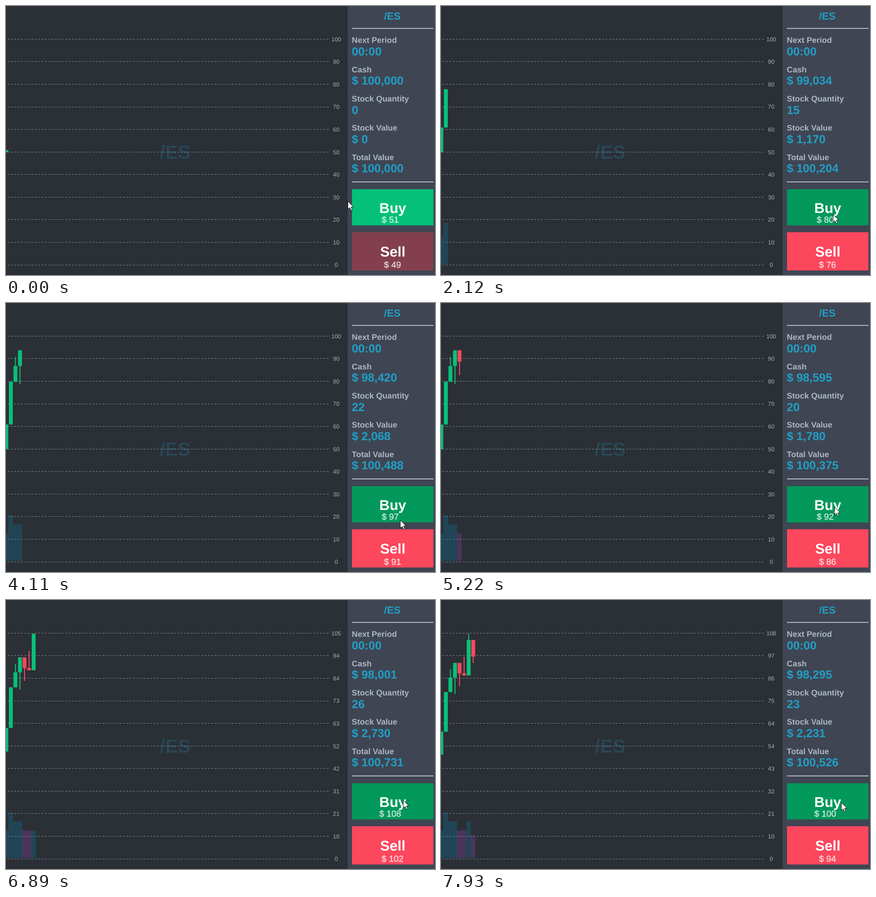
Recreate the animation shown at these times as an HTML page. Size 884 by 555 pixels, loop 8 s.

```html
<!DOCTYPE html>
<html lang="en">
<head>
<meta charset="utf-8">
<title>Trading game</title>
<style>
  html, body { margin: 0; width: 100%; height: 100%; overflow: hidden; background: #2b2f36; }
  svg { display: block; width: 884px; height: 555px; }
  text { font-family: "Liberation Sans", Arial, sans-serif; font-weight: 700; text-rendering: geometricPrecision; }
  .mid { text-anchor: middle; }
  .axis { font-size: 12px; font-weight: 400; fill: #a9b0b9; }
  .label { font-size: 16.7px; fill: #adb7c4; }
  .value { font-size: 24px; fill: #219fc6; }
  .title { font-size: 21px; fill: #219fc6; }
  .mark { font-size: 39px; fill: #20a4cc; opacity: .2; }
  .action { font-size: 29.3px; fill: #fff; }
  .price { font-size: 18px; font-weight: 400; fill: #fff; stroke: #fff; stroke-width: .35; opacity: .82; }
  .grid { stroke: #7d838b; stroke-width: 1; stroke-dasharray: 4 3; }
</style>
</head>
<body>
<svg viewBox="0 0 884 555">
  <rect width="884" height="555" fill="#2b2f36"/>
  <g id="axis"></g>
  <text class="mark mid" x="348.5" y="314.5">/ES</text>
  <g id="bars"></g>
  <rect x="704" width="180" height="555" fill="#3f4552"/>
  <text class="title mid" x="796" y="28">/ES</text>
  <rect x="713" y="45.4" width="168" height="1.7" fill="#c3cbd5"/>
  <rect x="713" y="362.1" width="168" height="1.7" fill="#c3cbd5"/>
  <g id="stats"></g>
  <rect id="buyBox" x="713" y="378" width="167.8" height="74.7"/>
  <text class="action mid" x="797" y="426.5">Buy</text>
  <text class="price mid" id="ask" x="791.7" y="447"></text>
  <rect id="sellBox" x="713" y="466.7" width="167.8" height="79"/>
  <text class="action mid" x="797" y="517">Sell</text>
  <text class="price mid" id="bid" x="796.5" y="540"></text>
  <path id="cursor" d="M0 0V16.5L3.9 12.9L6.6 19L9.2 17.9L6.6 11.9H11.8Z"
        fill="#fff" stroke="#111" stroke-width="1"/>
</svg>
<script>
const LOOP = 8000, BASE = 533.7, TOP = 68.4, STEP = 46.56, PITCH = 9.4;
const byId = id => document.getElementById(id);

function set(el, attrs) {
  for (const k in attrs) el.setAttribute(k, attrs[k]);
}
function make(parent, tag, attrs, text) {
  const el = document.createElementNS('http://www.w3.org/2000/svg', tag);
  set(el, attrs);
  if (text) el.textContent = text;
  parent.appendChild(el);
  return el;
}

// Buy and sell clicks of each period, and where the pointer rests on the Buy button.
const orders = ['BBBBBB', 'BBBBBBBBBB', 'BBBBBBSS', 'SSSBBBBB', 'SSSSBB', 'BBBSSS', 'BBBBBBBS', 'SSSSB'];
const rests = [[806, 432], [808, 430], [809, 428], [812.5, 448], [811, 421], [811, 421], [818.5, 413], [825, 418]];

const periodStart = i => i ? 300 + 1000 * i : 0;
const halfSpread = (period, count) => (period > 2 ? 3 : 2) - (count ? 0 : 1);
const money = n => '$ ' + n.toLocaleString('en-US');

// Clicks come in a steady rhythm, with a pause to change buttons.
const LEAD = 65, GAP = 88, PAUSE = 125, ARRIVAL = 560;
const trades = orders.flatMap((row, period) => {
  let at = Math.max(periodStart(period), ARRIVAL) + LEAD - GAP;
  return [...row].map((key, i) => {
    at += GAP + (i && key !== row[i - 1] ? PAUSE : 0);
    const [x, y] = rests[period];
    return key === 'B' ? { period, at, side: 1, x, y } : { period, at, side: -1, x: x + 10, y: 509 };
  });
});

const axisLabels = [];
for (let i = 0; i <= 10; i++) {
  const y = TOP + STEP * i, line = Math.floor(y) + .5;
  make(byId('axis'), 'line', { class: 'grid', x1: 665, x2: 0, y1: line, y2: line });
  axisLabels.push(make(byId('axis'), 'text', { class: 'axis mid', x: 680.5, y: y + 4.4 }));
}

const values = ['Next Period', 'Cash', 'Stock Quantity', 'Stock Value', 'Total Value'].map((name, i) => {
  const y = 60.3 * i;
  make(byId('stats'), 'text', { class: 'label', x: 712.6, y: 76.4 + y }, name);
  return make(byId('stats'), 'text', { class: 'value', x: 712.4, y: 102 + y });
});

const candleEls = orders.map(() => ({
  volume: make(byId('bars'), 'rect', { width: PITCH, opacity: .27 }),
  wick: make(byId('bars'), 'rect', { width: 2 }),
  body: make(byId('bars'), 'rect', { width: 8 })
}));

// Replays every click up to time t; each trade moves the price by the half spread.
function market(t) {
  let price = 50, cash = 100000, qty = 0, high = 100;
  const candles = [];
  for (let i = 0; i < orders.length && periodStart(i) <= t; i++) {
    const c = { open: price, low: price, high: price, count: 0 };
    for (const { period, side, at } of trades) {
      if (period !== i || at > t) continue;
      price += side * halfSpread(i, c.count++);
      cash -= side * price;
      qty += side;
      c.low = Math.min(c.low, price);
      c.high = Math.max(c.high, price);
    }
    c.close = price;
    high = Math.max(high, c.high);
    candles.push(c);
  }
  const last = candles.length - 1;
  return { price, cash, qty, high, candles, half: halfSpread(last, candles[last].count) };
}

// The pointer eases to each click's spot and settles shortly before the click.
function cursorAt(t) {
  let from = { at: 0, x: 704.5, y: 403 };
  for (const to of trades) {
    const end = to.at - 50, start = Math.max(from.at, end - 260);
    if (t < end) {
      const p = Math.max(0, (t - start) / (end - start)), e = p * p * (3 - 2 * p);
      return [from.x + (to.x - from.x) * e, from.y + (to.y - from.y) * e];
    }
    from = to;
  }
  return [from.x, from.y];
}

function drawCandle(el, c, i, scale) {
  for (const k in el) el[k].setAttribute('visibility', c ? 'visible' : 'hidden');
  if (!c) return;
  const x = 5 + PITCH * (i - 1), y = p => BASE - p * scale;
  const up = c.close >= c.open, fill = up ? '#08c079' : '#fa475c';
  const height = Math.max(4.4, Math.abs(c.open - c.close) * scale);
  const bottom = y(Math.min(c.open, c.close));
  set(el.body, { x: x + 1, y: bottom - height, height, fill });
  set(el.wick, { x: x + 4, y: y(c.high), height: (c.high - c.low) * scale, fill });
  set(el.volume, { x, y: 532 - 9.4 * c.count, height: 9.4 * c.count, fill: up ? '#0a81ad' : '#9c46c2' });
}

function draw(t) {
  const m = market(t), [x, y] = cursorAt(t);
  const over = (top, bottom) => x >= 713 && x <= 881 && y >= top && y <= bottom;

  axisLabels.forEach((el, i) => el.textContent = Math.floor(m.high * (10 - i) / 10 + 1e-6));
  candleEls.forEach((el, i) => drawCandle(el, m.candles[i], i, 464 / m.high));

  const stock = m.qty * m.price;
  ['00:00', money(m.cash), m.qty, money(stock), money(m.cash + stock)]
    .forEach((v, i) => values[i].textContent = v);

  byId('ask').textContent = money(m.price + m.half);
  byId('bid').textContent = money(m.price - m.half);
  set(byId('buyBox'), { fill: over(378, 453) ? '#02985c' : '#05c079' });
  set(byId('sellBox'), { fill: !m.qty ? '#833f4d' : over(467, 546) ? '#c83849' : '#fc475d' });
  set(byId('cursor'), { transform: `translate(${x} ${y})` });
}

const began = performance.now();
function tick() {
  draw((performance.now() - began) % LOOP);
  requestAnimationFrame(tick);
}
tick();
</script>
</body>
</html>
```
